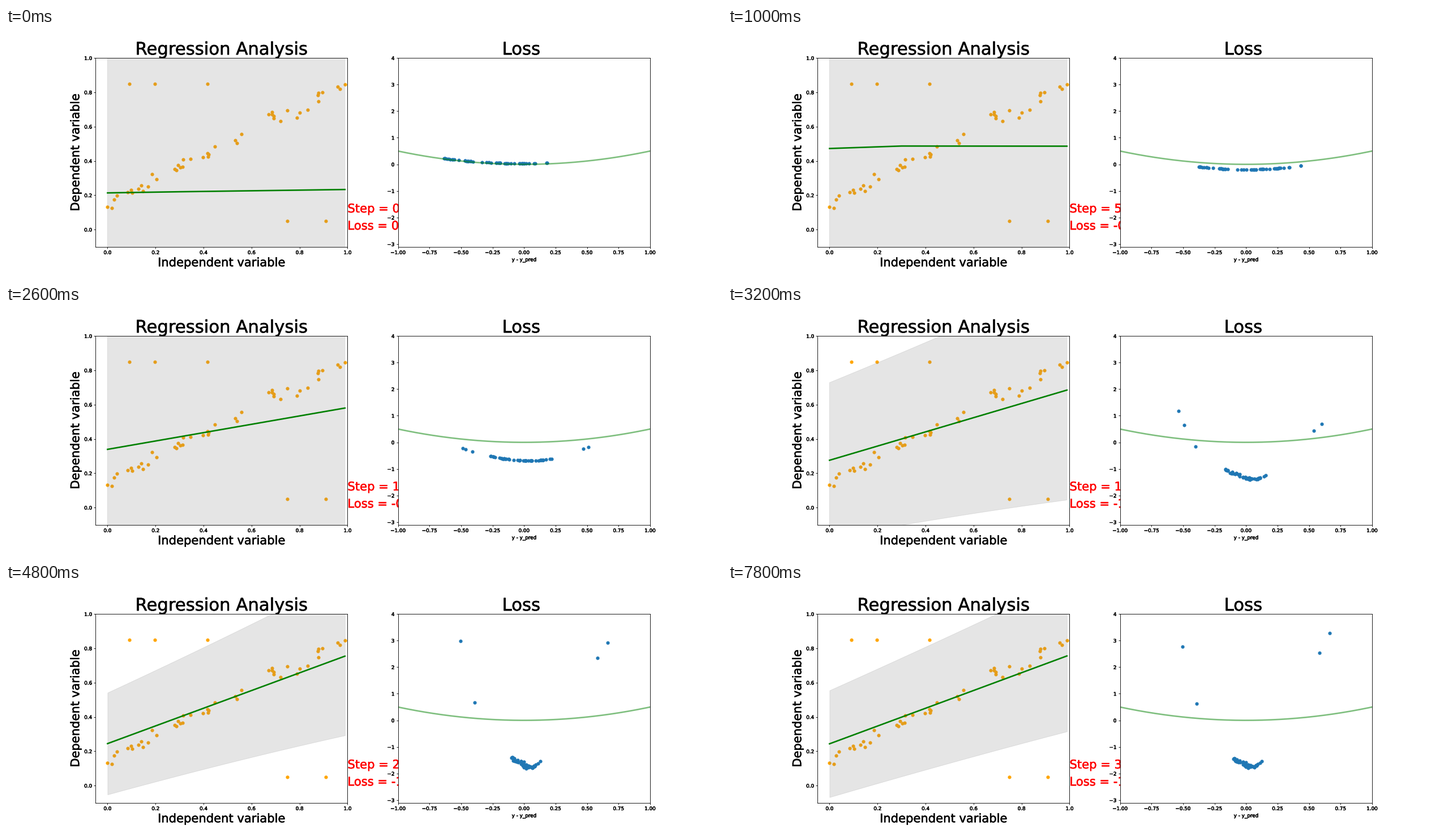
These frames come from a looping animation (1265 by 443 pixels, 8 s). A matplotlib script:

```python
import numpy as np
import matplotlib.pyplot as plt
from matplotlib.animation import FuncAnimation
from matplotlib.patheffects import withStroke

FRAMES, INTERVAL = 40, 200
W, H, DPI = 1265, 443, 63.25

plt.rcParams.update({
    "font.family": "DejaVu Sans",
    "font.size": 10,
    "axes.linewidth": 1.0,
    "xtick.major.width": 1.0,
    "ytick.major.width": 1.0,
})

# Noisy linear data with a few outliers
rng = np.random.RandomState(1)
X = rng.rand(50)
Y = 0.15 + 0.7 * X + 0.025 * rng.randn(50)
Y[[0, 5, 19]] = 0.85
Y[[39, 46]] = 0.05
grid = np.linspace(X.min(), X.max(), 100)


def sigmoid(t):
    return 1 / (1 + np.exp(-t))


def predict(x, n):
    """Predicted mean and log deviation at training step n."""
    k = x / X.max() - 0.5

    # The mean jumps up, swings once and then tilts towards the data
    swing = n - 10.5
    mid = 0.4995 - 0.276 * np.exp(-n / 2.55) - 0.0225 * swing * np.exp(-(swing / 4) ** 2)
    slope = 0.512 * sigmoid((n - 13.25) / 2) + 0.019 * np.exp(-n / 4)
    kink = 0.0103 * np.exp(-((n - 5) / 3) ** 2)
    mu = mid + slope * k + kink * np.interp(x, [0, 0.3, 0.99], [0, 1, 0])

    # The deviation shrinks steadily, then drops to its final level
    settled = sigmoid((n - 15.41) / 1.163)
    level = (0.03 - 0.045 * n) * (1 - settled) - 1.687 * settled
    tilt = settled * (0.3 + 0.85 * np.exp(-n / 13.4))
    return mu, level + tilt * k


def thicken(*texts):
    for t in texts:
        t.set_path_effects([withStroke(linewidth=0.6, foreground=t.get_color())])


fig, (ax, ax2) = plt.subplots(1, 2, figsize=(W / DPI, H / DPI), dpi=DPI)
fig.patch.set_facecolor("white")
fig.subplots_adjust(left=0.125, right=0.8995, bottom=0.125, top=0.88, wspace=0.2)

ax.set_title("Regression Analysis", fontsize=35)
ax.set_xlabel("Independent variable", fontsize=24)
ax.set_ylabel("Dependent variable", fontsize=24, labelpad=5.5)
ax.set(xlim=(-0.05, 1.0), ylim=(-0.1, 1.0),
       xticks=np.arange(6) / 5, yticks=np.arange(6) / 5)

ax2.set_title("Loss ", fontsize=35)
ax2.set_xlabel("y - y_pred")
ax2.set(xlim=(-1, 1), ylim=(-3.1, 4),
        xticks=np.linspace(-1, 1, 9), yticks=np.arange(-3, 5))

ax.scatter(X, Y, color="orange")
band = ax.fill_between(grid, grid, grid, color="gray", alpha=0.2)
line, = ax.plot([], [], color="green", lw=3)
step = ax.text(1.0, 0.1, "", fontsize=24, color="red")
loss = ax.text(1.0, 0.0, "", fontsize=24, color="red")

dots = ax2.scatter(X, Y, color="C0")
curve = np.linspace(-1, 1, 200)
ax2.plot(curve, curve ** 2 / 2, color="green", lw=3, alpha=0.5)

for a in (ax, ax2):
    thicken(a.title, a.xaxis.label, a.yaxis.label,
            *a.get_xticklabels(), *a.get_yticklabels())
thicken(step, loss)


def draw(n):
    mu, ls = predict(grid, n)
    half = 2 * np.exp(ls)
    line.set_data(grid, mu)
    edge_x = np.concatenate([grid, grid[::-1]])
    edge_y = np.concatenate([mu - half, (mu + half)[::-1]])
    band.set_verts([np.column_stack([edge_x, edge_y])])

    mu, ls = predict(X, n)
    err = mu - Y
    nll = ls + err ** 2 / (2 * np.exp(2 * ls))
    dots.set_offsets(np.column_stack([err, nll]))
    step.set_text(f"Step = {n}")
    loss.set_text(f"Loss = {nll.mean():.4f}")
    return line, band, dots, step, loss


anim = FuncAnimation(fig, draw, frames=FRAMES, interval=INTERVAL,
                     init_func=lambda: draw(0), repeat=True, repeat_delay=0)
plt.show()
```
